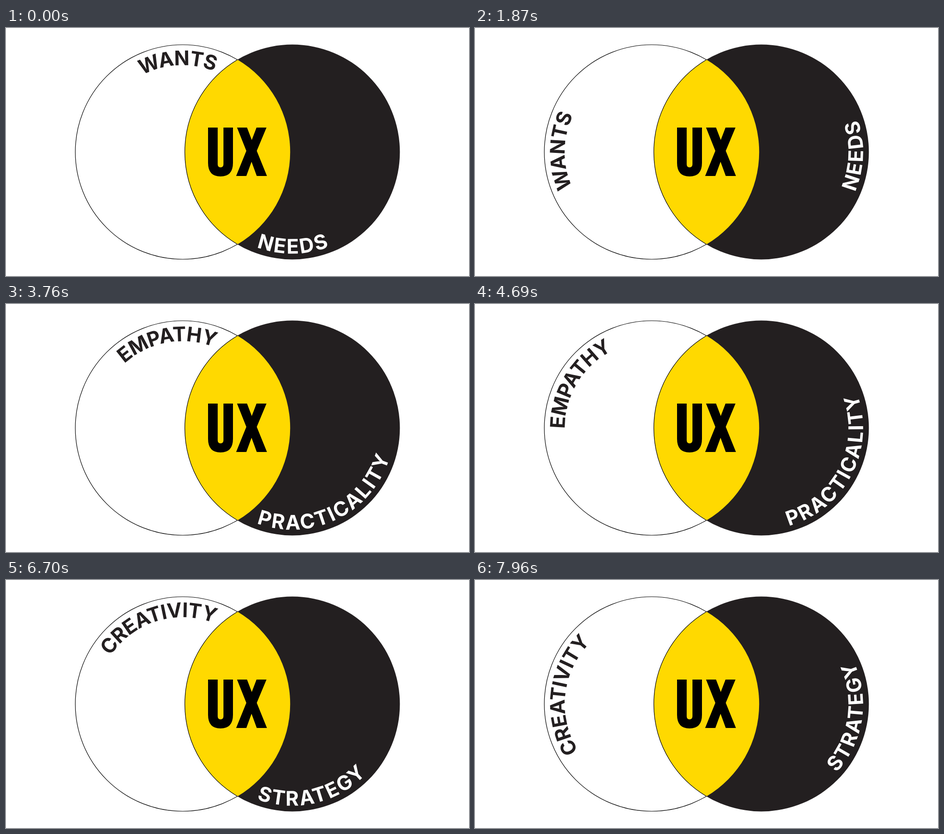
An HTML page that plays this animation: 1022 by 548 pixels, repeating every 7990 ms.

```html
<!DOCTYPE html>
<html lang="en">
<head>
<meta charset="utf-8">
<title>UX Venn diagram</title>
<style>
  html, body { margin: 0; width: 100%; height: 100%; overflow: hidden; background: #fff; }
  svg { display: block; width: 1022px; height: 548px; }
  text { font: 700 44.6px Inter, "Open Sans", sans-serif; }
  #left { fill: #231f20; letter-spacing: -1px; text-anchor: end; }
  #right { fill: #fff; letter-spacing: 3.4px; }
  .line { fill: none; stroke: #000; stroke-width: 1.2; }
</style>
</head>
<body>
<svg viewBox="0 0 1022 548">
  <defs>
    <path id="leftRing"/>
    <path id="rightRing"/>
  </defs>
  <circle class="line" cx="390" cy="274" r="237"/>
  <circle cx="632" cy="274" r="237.4" fill="#231f20"/>
  <g id="left"><text><textPath href="#leftRing" startOffset="100%"></textPath></text></g>
  <g id="right"><text><textPath href="#rightRing"></textPath></text></g>
  <path d="M511 70A237.1 237.1 0 0 1 511 478A237.1 237.1 0 0 1 511 70" fill="#ffd900"/>
  <path class="line" d="M511 70A237.1 237.1 0 0 0 511 478"/>
  <g role="img" aria-label="UX">
    <path d="M446 220H467.3V301Q467.3 308 473.6 308T480 301V220H501V298Q501 328 473.5 328T446 298Z"/>
    <path d="M510 220H532L542.5 247.5L553 220H575L553.5 271.5L576 327H553.5L542 295.5L530.5 327H508L530.5 271.5Z"/>
  </g>
</svg>
<script>
const LOOP = 7990, CY = 274;
const SWAP = 242; // the word changes while it is hidden behind the lens

const sides = [
  { id: "left", cx: 390, words: ["WANTS", "EMPATHY", "CREATIVITY"] },
  { id: "right", cx: 632, words: ["NEEDS", "PRACTICALITY", "STRATEGY"] }
];

// Each move is one full turn; ease holds the x handles for the left and right word.
const moves = [
  { start: 980, length: 2345, ease: [[.41, .8], [.404, .8]] },
  { start: 4000, length: 2640, ease: [[.35, .87], [.48, .77]] },
  { start: 7000, length: 2900, ease: [[.416, .8], [.404, .8]] }
];

// Angles are clockwise from the top.
function arc(cx, r, from, to, sweep) {
  const point = deg => {
    const a = deg * Math.PI / 180;
    return `${cx + r * Math.sin(a)} ${CY - r * Math.cos(a)}`;
  };
  return `M${point(from)}A${r} ${r} 0 0 ${sweep} ${point(to)}`;
}

// Cubic Bézier ease with handles (a, 0) and (b, 1).
function bezier(x, [a, b]) {
  let low = 0, high = 1, v;
  for (let i = 0; i < 30; i++) {
    v = (low + high) / 2;
    const w = 1 - v;
    if (3 * v * w * w * a + 3 * v * v * w * b + v * v * v < x) low = v; else high = v;
  }
  return v * v * (3 - 2 * v);
}

function pose(t, side) {
  let angle = 0, word = 0;
  moves.forEach((move, i) => {
    if (t < move.start) return;
    const x = Math.min(1, (t - move.start) / move.length);
    angle = 360 * bezier(x, move.ease[side]);
    word = i + (angle > SWAP ? 1 : 0);
  });
  return { angle, word };
}

leftRing.setAttribute("d", arc(sides[0].cx, 191.8, -150, 21.2, 1));
rightRing.setAttribute("d", arc(sides[1].cx, 224.6, 200.5, 30, 0));
for (const side of sides) {
  side.group = document.getElementById(side.id);
  side.label = side.group.querySelector("textPath");
}

function draw(now) {
  const t = now % LOOP;
  sides.forEach((side, i) => {
    const { angle, word } = pose(t, i);
    side.group.setAttribute("transform", `rotate(${-angle} ${side.cx} ${CY})`);
    if (side.label.textContent !== side.words[word]) side.label.textContent = side.words[word];
  });
  requestAnimationFrame(draw);
}
draw(performance.now());
</script>
</body>
</html>
```
